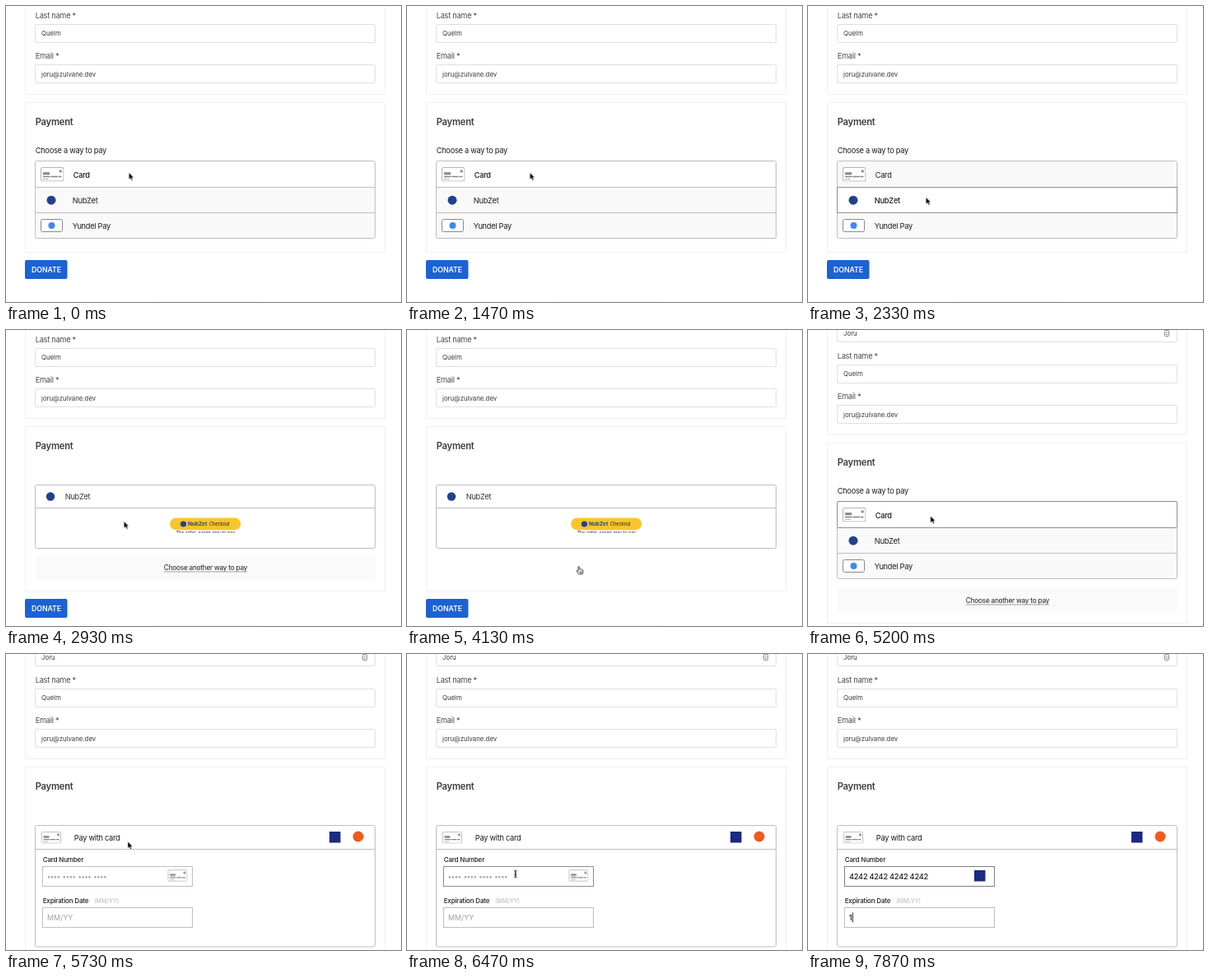
An HTML page that plays this animation: 480 px wide and 360 px high, repeating every 8 s.

```html
<!DOCTYPE html>
<html lang="en">
<head>
<meta charset="utf-8">
<title>Donation form</title>
<style>
html, body { margin: 0; width: 100%; height: 100%; overflow: hidden; background: #fff; }
svg { display: block; width: 480px; height: 360px; }
text { font-family: Inter, "Liberation Sans", sans-serif; fill: #1c1c1c; }

.label { font-size: 9.25px; letter-spacing: -.03em; }
.soft { fill: #4a4a4a; }
.value { font-size: 7.8px; fill: #3a3a3a; }
.title { font-size: 11.2px; font-weight: 600; letter-spacing: -.02em; fill: #3c3c3c; }
.small { font-size: 8px; font-weight: 500; letter-spacing: -.02em; }
.field { fill: #fff; stroke: #e0e0e0; }
.panel { fill: none; stroke: #f0f0f0; }
.box { fill: #fff; stroke: #bebebe; }
.line { fill: none; stroke: #bebebe; }
.focus { fill: none; stroke: #8e8e8e; }
.caret { stroke: #222; }

/* Everything runs on one 8 s clock; most changes are hard. */
.k { animation: 8s step-end infinite; }

.page { animation-name: page; }
@keyframes page { 0% { transform: none } 52.5%, 100% { transform: translateY(20px) } }

.heading { animation: heading 8s ease-in-out infinite; }
@keyframes heading {
  0%, 30% { transform: translateY(0) }
  33%, 52.5% { transform: translateY(18px) }
  57.5%, 65.87% { transform: translateY(0) }
  65.875%, 100% { transform: translateY(18px) }
}

.foot { animation-name: foot; }
@keyframes foot {
  0% { transform: none }
  32.5% { transform: translateY(18px) }
  52.5% { transform: none }
  63.375% { transform: translateY(37px) }
  65.875%, 100% { transform: translateY(140px) }
}

.options { animation-name: options; }
@keyframes options { 0% { opacity: 1 } 32.5% { opacity: 0 } 52.5% { opacity: 1 } 65.875%, 100% { opacity: 0 } }

/* Rows: color is the row background. */
.row { color: #f9f9f9; font-weight: 400; }
.row1 { animation-name: row1; }
.row2 { animation-name: row2; }
.row3 { animation-name: row3; }
@keyframes row1 {
  0% { color: #fff; font-weight: 500 }
  20% { color: #f9f9f9; font-weight: 400 }
  56.25%, 100% { color: #fff; font-weight: 500 }
}
@keyframes row2 {
  0% { color: #f9f9f9; font-weight: 400 }
  20% { color: #fff; font-weight: 500 }
  32.5%, 100% { color: #f9f9f9; font-weight: 400 }
}
@keyframes row3 {
  0% { color: #f9f9f9; font-weight: 400 }
  52.5% { color: #fff; font-weight: 500 }
  56.25%, 100% { color: #f9f9f9; font-weight: 400 }
}
.focus1 { animation-name: focus1; }
.focus2 { animation-name: focus2; }
@keyframes focus1 { 0% { opacity: 0 } 60.875%, 100% { opacity: 1 } }
@keyframes focus2 { 0% { opacity: 0 } 27.5% { opacity: 1 } 32.5%, 100% { opacity: 0 } }

.wallet { animation-name: wallet; }
@keyframes wallet { 0% { opacity: 0 } 32.5% { opacity: 1 } 52.5%, 100% { opacity: 0 } }
.toggle { animation-name: toggle; }
@keyframes toggle {
  0% { opacity: 0; transform: none }
  32.5% { opacity: 1; transform: none }
  51.625% { opacity: 0; transform: none }
  63.375% { opacity: 1; transform: translateY(20px) }
  65.875%, 100% { opacity: 0; transform: none }
}

.card { animation-name: card; }
@keyframes card { 0% { opacity: 0 } 65.875%, 100% { opacity: 1 } }
.number { animation-name: number; }
@keyframes number { 0% { stroke: #bebebe } 77.5% { stroke: #8e8e8e } 84.125%, 100% { stroke: #808080 } }
.dots { animation-name: dots; }
@keyframes dots { 0% { opacity: 1 } 85%, 100% { opacity: 0 } }
.digits { animation-name: digits; }
@keyframes digits { 0% { opacity: 0 } 85%, 100% { opacity: 1 } }
.generic { animation: generic 8s linear infinite; }
@keyframes generic { 0%, 85.875% { opacity: 1 } 89.125%, 100% { opacity: 0 } }
.brand { animation: brand 8s linear infinite; }
@keyframes brand { 0%, 85.875% { opacity: 0 } 89.125%, 100% { opacity: 1 } }
.hint { animation-name: hint; }
@keyframes hint { 0% { opacity: 1 } 98.375%, 100% { opacity: 0 } }
.typed { animation-name: typed; }
@keyframes typed { 0% { opacity: 0 } 98.375%, 100% { opacity: 1 } }
.caret1 { animation-name: caret1; }
@keyframes caret1 {
  0% { opacity: 0; transform: none }
  84.125% { opacity: 1; transform: none }
  85% { opacity: 1; transform: translateX(97px) }
  89.125%, 100% { opacity: 0; transform: none }
}
.caret2 { animation-name: caret2; }
@keyframes caret2 {
  0% { opacity: 0; transform: none }
  89.125% { opacity: 1; transform: none }
  96.625% { opacity: 0; transform: none }
  98.375%, 100% { opacity: 1; transform: translateX(4px) }
}

.dock { animation-name: dock; }
@keyframes dock { 0% { opacity: 1 } 63.375%, 100% { opacity: 0 } }

.pointer { animation: pointer 8s ease-in-out infinite; }
@keyframes pointer {
  0%, 18.375% { transform: translate(149.3px, 202.5px) }
  21.625%, 38.375% { transform: translate(143.3px, 232.5px) }
  42.5%, 55% { transform: translate(208.8px, 287.5px) }
  57.5%, 70% { transform: translate(148.7px, 226px) }
  80.875%, 100% { transform: translate(131.8px, 267.5px) }
}
.arrow { animation-name: arrow; }
@keyframes arrow { 0% { opacity: 1 } 41.5% { opacity: 0 } 55.2% { opacity: 1 } 77.5%, 100% { opacity: 0 } }
.hand { animation-name: hand; }
@keyframes hand { 0% { opacity: 0 } 41.5% { opacity: 1 } 55.2%, 100% { opacity: 0 } }
.beam { animation-name: beam; }
@keyframes beam { 0% { opacity: 0 } 77.5% { opacity: 1 } 85%, 100% { opacity: 0 } }
</style>
</head>
<body>
<svg viewBox="0 0 480 360">
  <defs>
    <symbol id="chip" viewBox="0 0 28 17">
      <rect x=".5" y=".5" width="27" height="16" rx="2" fill="#fff" stroke="#b4b4b4"/>
      <rect x="3" y="6" width="8" height="3" fill="#8a8a8a"/>
      <path d="M3 11.2H25" stroke="#858585" stroke-width="1.6" stroke-dasharray="8.5 .8 8 .8"/>
      <path d="M3.5 14.2H9" stroke="#999" stroke-dasharray="2.2 1"/>
      <circle cx="23.8" cy="4.7" r="1.7" fill="#8a8a8a"/>
    </symbol>
  </defs>

  <g class="k page">
    <rect class="panel" x="23.5" y="-200.5" width="437" height="308"/>
    <rect class="field" x="35.5" y="-27.5" width="413" height="22" rx="1.5"/>
    <text class="value" x="43" y="-13.2">Joru</text>
    <rect x="433.5" y="-19.5" width="5" height="7" rx=".8" fill="#fff" stroke="#888"/>
    <path d="M436 -18v1.6M434.8 -14.8h2.4" stroke="#777"/>
    <text class="label soft" x="35.7" y="15.4">Last name *</text>
    <rect class="field" x="35.5" y="22.5" width="413" height="22" rx="1.5"/>
    <text class="value" x="43" y="36.4">Quelm</text>
    <text class="label soft" x="35.7" y="64.4">Email *</text>
    <rect class="field" x="35.5" y="71.5" width="413" height="22" rx="1.5"/>
    <text class="value" x="43" y="85.6">joru@zulvane.dev</text>

    <path class="panel" d="M23.5 600V117.5H460.5V600"/>
    <text class="title" x="35.7" y="145.2">Payment</text>
    <text class="label heading" x="35.7" y="178.8">Choose a way to pay</text>

    <g class="k foot">
      <path d="M0 300H480V700H0Z" fill="#fff"/>
      <path class="panel" d="M23 299.5H461"/>
      <rect x="23" y="309" width="51.5" height="23" rx="2" fill="#1b62d4"/>
      <text x="49" y="324" text-anchor="middle" font-size="8.7" font-weight="600" style="fill:#fff">DONATE</text>
    </g>

    <g class="k options">
      <g class="k row row1">
        <rect x="36" y="189" width="413" height="32" fill="currentColor"/>
        <use href="#chip" x="42" y="196" width="28.5" height="17.5"/>
        <text class="label" x="81.7" y="208.5">Card</text>
      </g>
      <g class="k row row2">
        <rect x="36" y="220" width="413" height="32" fill="currentColor"/>
        <circle cx="55" cy="236.2" r="5.5" fill="#21418f"/>
        <text class="label" x="80.8" y="240.2">NubZet</text>
      </g>
      <g class="k row row3">
        <rect x="36" y="251" width="413" height="32" fill="currentColor"/>
        <rect x="42.5" y="259.5" width="26" height="15" rx="2" fill="#fff" stroke="#8a8a8a"/>
        <circle cx="55.5" cy="267" r="4" fill="#4285f4"/>
        <text class="label" x="80.8" y="271">Yundel Pay</text>
      </g>
      <rect class="line" x="35.5" y="188.5" width="413" height="94" rx="2"/>
      <path class="line" d="M36 220.5H448M36 251.5H448"/>
      <rect class="focus k focus1" x="35.5" y="188.5" width="413" height="32" rx="1"/>
      <rect class="focus k focus2" x="35.5" y="220.5" width="413" height="31"/>
    </g>

    <g class="k wallet">
      <rect class="box" x="35.5" y="188.5" width="413" height="77" rx="2"/>
      <path class="line" d="M36 216.5H448"/>
      <circle cx="54" cy="202.5" r="5.2" fill="#21418f"/>
      <text class="label" x="71.7" y="206.2" style="fill:#333">NubZet</text>
      <rect x="199.2" y="228.6" width="86" height="14.6" rx="7.3" fill="#f8c52c"/>
      <circle cx="215.5" cy="236" r="3.6" fill="#21418f"/>
      <text x="221" y="238.4" font-size="6.4" font-weight="700" style="fill:#21418f">NubZet</text>
      <text x="247" y="238.2" font-size="5.5">Checkout</text>
      <svg x="200" y="243" width="84" height="3.8" viewBox="200 243 84 3.8">
        <text x="242.5" y="248" font-size="5.4" text-anchor="middle">The safer, easier way to pay</text>
      </svg>
    </g>

    <g class="k toggle">
      <rect x="36" y="274" width="413" height="30" fill="#fafafa"/>
      <text x="242.5" y="291.5" font-size="8.3" letter-spacing="-.25" text-anchor="middle">Choose another way to pay</text>
      <path d="M192 294H293" stroke="#888" stroke-width=".8"/>
    </g>

    <g class="k card">
      <rect class="box" x="35.5" y="188.5" width="413" height="147.5" rx="2"/>
      <path class="line" d="M36 217.5H448"/>
      <use href="#chip" x="43" y="196" width="24" height="14.6"/>
      <text class="label" x="82.8" y="207">Pay with card</text>
      <rect x="393" y="196" width="13.5" height="13.5" fill="#1c2a80"/>
      <circle cx="428" cy="202" r="6.5" fill="#ee5a1f"/>

      <text class="small" x="44.7" y="233">Card Number</text>
      <rect class="k number" x="44.5" y="238.5" width="182" height="24" fill="#fff"/>
      <path class="k dots" d="M52 251.3H120.6" stroke="#aaa" stroke-width="2.8" stroke-linecap="round" stroke-dasharray="0 4 0 4 0 4 0 6.8"/>
      <text class="k digits" x="50" y="253.5" font-size="9.2" font-weight="500" letter-spacing="-.23">4242 4242 4242 4242</text>
      <use class="generic" href="#chip" x="196.5" y="242" width="24" height="15"/>
      <rect class="brand" x="202" y="243" width="13.5" height="13.5" fill="#1c2a80"/>
      <path class="caret k caret1" d="M50.5 245V256"/>

      <text class="small" x="44.7" y="283.2">Expiration Date</text>
      <text x="107" y="283" font-size="7.1" style="fill:#b8b8b8">(MM/YY)</text>
      <rect class="box" x="44.5" y="288.5" width="182" height="24"/>
      <text class="k hint" x="50" y="304" font-size="8.9" style="fill:#a0a0a0">MM/YY</text>
      <text class="k typed" x="49.8" y="304" font-size="9.2" font-weight="500">1</text>
      <path class="caret k caret2" d="M50.3 294.5V306.5"/>
    </g>
  </g>

  <path class="k dock" d="M179 360Q181 357.5 186 357.5H304Q309 357.5 311 360Z" fill="#fafafa"/>

  <g class="pointer">
    <path class="k arrow" d="M0 0V8.6L2 6.8L3.3 9.8L4.9 9.1L3.6 6.2H6Z" fill="#000" stroke="#fff" stroke-width=".6"/>
    <path class="k hand" d="M-.8 .8Q0 -.3 .9 .8V3.4L4.6 4.2Q5.4 4.5 5.2 5.6L4.4 9.3H-.2L-2.6 5.8Q-2.8 4.7 -1.6 5L-.8 5.7ZM1.6 5.8V8M3.1 5.8V8" fill="#fff" stroke="#222" stroke-width=".9" stroke-linejoin="round"/>
    <path class="k beam" d="M-1.8 -4.3Q0 -4.3 0 -3V3Q0 4.3 -1.8 4.3M1.8 -4.3Q0 -4.3 0 -3V3Q0 4.3 1.8 4.3M-1 .9H1" fill="none" stroke="#111" stroke-width=".9"/>
  </g>
</svg>
</body>
</html>
```
